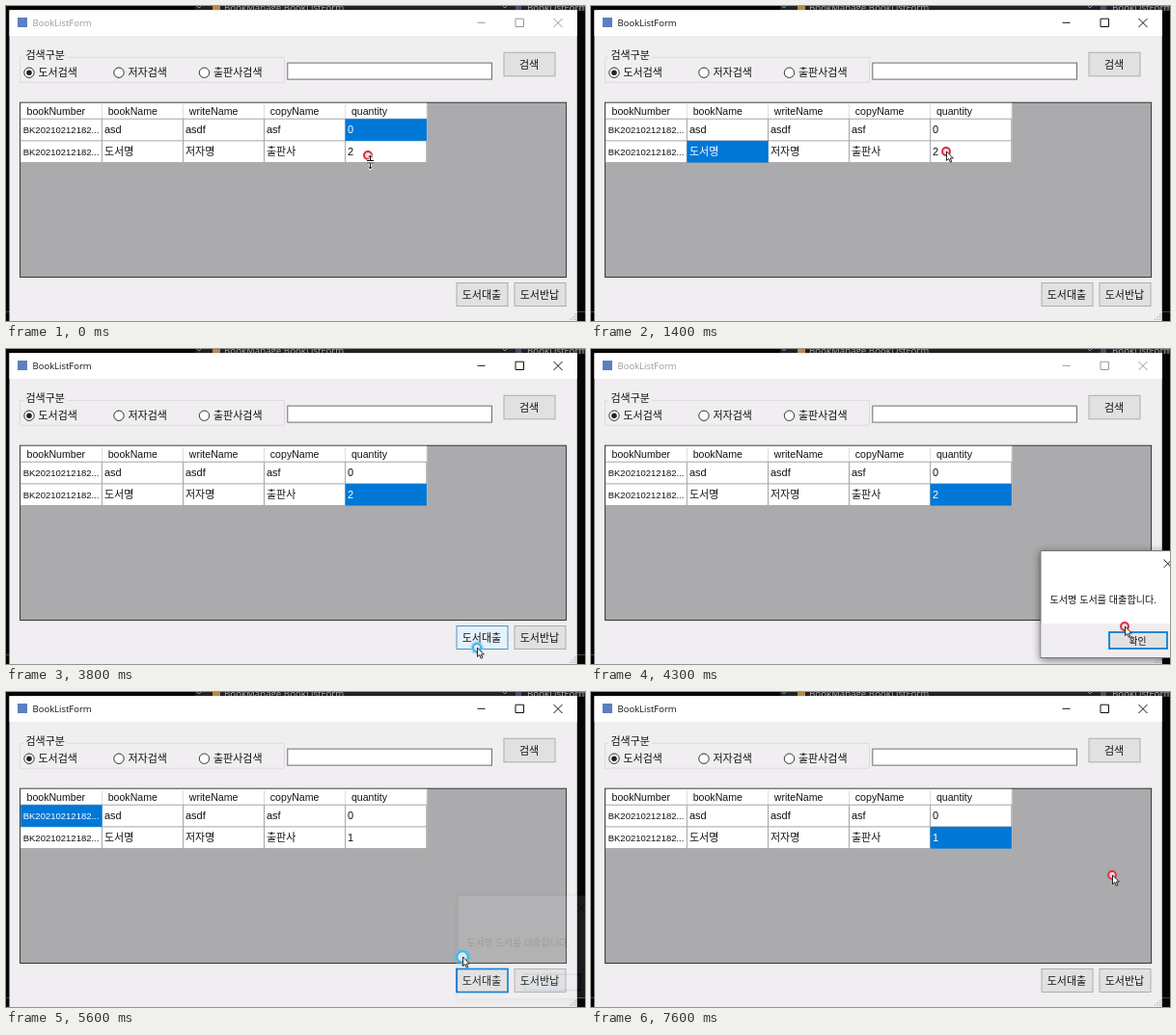
These frames come from a looping animation (600x327 px, 8 s). An HTML page:

```html
<!DOCTYPE html>
<html lang="ko">
<head>
<meta charset="utf-8">
<title>BookListForm</title>
<style>
html, body { margin: 0; width: 100%; height: 100%; overflow: hidden; background: #050505; }
svg { display: block; width: 100vw; height: 100vh; }
text { font-family: "Liberation Sans", "Noto Sans CJK KR", "Noto Sans CJK", sans-serif; font-size: 11px; fill: #111; white-space: pre; }
.ui { font-family: "Open Sans", "Noto Sans", sans-serif; }
.mid { text-anchor: middle; }
.tab { fill: #b0b0b0; }
#dialog { filter: drop-shadow(0 2px 4px rgba(0, 0, 0, .5)); }
</style>
</head>
<body>
<svg id="stage" viewBox="0 0 600 327"></svg>
<script>
const NS = 'http://www.w3.org/2000/svg';
const stage = document.getElementById('stage');
const BLUE = '#0078d7';
const LOOP = 8000, STEP = 100;

function add(parent, tag, attrs, content) {
  const el = document.createElementNS(NS, tag);
  set(el, attrs || {});
  if (content !== undefined) el.textContent = content;
  parent.appendChild(el);
  return el;
}
function set(el, attrs) {
  for (const key in attrs) el.setAttribute(key, attrs[key]);
}
function box(parent, x, y, width, height, fill, stroke) {
  return add(parent, 'rect', { x, y, width, height, fill, stroke: stroke || 'none' });
}
function path(parent, d, stroke, width = 1) {
  return add(parent, 'path', { d, stroke, fill: 'none', 'stroke-width': width });
}
function label(parent, x, y, str, size = 11, cls = '') {
  return add(parent, 'text', { x, y, class: cls, style: `font-size:${size}px` }, str);
}
function button(parent, x, y, w, h, str, size) {
  const face = box(parent, x, y, w, h, '#e1e1e1', '#adadad');
  label(parent, x + w / 2 - .5, y + h / 2 + 4, str, size, 'mid');
  return face;
}
function paintButton(face, hover, focus) {
  set(face, {
    fill: hover ? '#e5f1fb' : '#e1e1e1',
    stroke: focus ? BLUE : hover ? '#4f93c9' : '#adadad',
    'stroke-width': focus ? 1.7 : 1
  });
}

// Editor behind the window
box(stage, 0, 0, 600, 327, '#050505');
box(stage, 196, 0, 404, 5, '#222124');
path(stage, 'M0 317.500H600', '#444');
path(stage, 'M198 0l2 2 2-2M515 0l2 2 2-2', '#aaa', .8);
box(stage, 214, 0, 8, 4, '#b98a45');
box(stage, 528, 0, 6, 4, '#54486e');
label(stage, 226, 4.8, 'BookManage.BookListForm', 9.7, 'ui tab');
label(stage, 540, 4.8, 'BookListForm', 9.7, 'ui tab');

// Window frame
box(stage, 3.5, 4.3, 588.3, 323, '#f0eef0');
box(stage, 3.5, 4.3, 588.3, 26.7, '#fff');
box(stage, 12, 12, 10, 10, '#5b7fc0');
const title = label(stage, 27.5, 20.7, 'BookListForm', 9.5, 'ui');
const controls = path(stage, 'M488.500 17.300h8M528 13.200h8.500v8.300h-8.500zM567.500 13l9 9m0-9l-9 9', '#111');
for (let i = 0; i < 3; i++) {
  for (let j = 0; j <= i; j++) box(stage, 589 - 2.5 * j, 319.5 + 2.5 * i, 1.3, 1.3, '#b5b3b5');
}

// Search group
path(stage, 'M18 53.300H14.500V79.200H288.500V53.300H63', '#dddbdd');
label(stage, 20.5, 54.8, '검색구분', 11);
[[24, '도서검색'], [117, '저자검색'], [205.500, '출판사검색']].forEach(([x, str], i) => {
  add(stage, 'circle', { cx: x, cy: 69.2, r: 5.2, fill: '#fff', stroke: '#333' });
  if (!i) add(stage, 'circle', { cx: x, cy: 69.2, r: 2.8, fill: '#222' });
  label(stage, x + 9.500, 73, str);
});
box(stage, 291.8, 59.1, 211.7, 17, '#fff', '#6e6e6e');
button(stage, 516, 48.3, 53, 24.5, '검색');

// Data grid
box(stage, 14.6, 100.2, 566, 181.3, '#abaaac', '#333');
box(stage, 15.2, 100.8, 421, 62.2, '#fff');
const edges = [15.2, 99.4, 183.5, 267.5, 351.6, 435.8];
const heads = ['bookNumber', 'bookName', 'writeName', 'copyName', 'quantity'];
const rows = [
  ['BK20210212182...', 'asd', 'asdf', 'asf', '0'],
  ['BK20210212182...', '도서명', '저자명', '출판사', '2']
];
const TOP = 117.2, ROW = 22.7;
path(stage, edges.slice(1).map(x => `M${x} 102V117`).join(''), '#dedede');
path(stage, [0, 1, 2].map(r => `M15.200 ${TOP + ROW * r}H436`).join('') +
  edges.slice(1).map(x => `M${x} ${TOP}v${2 * ROW}`).join(''), '#a6a4a6');
heads.forEach((str, c) => label(stage, edges[c] + 6.3, 112.5, str, 10.6));
const cells = rows.map((row, r) => row.map((str, c) => ({
  back: box(stage, edges[c], TOP + ROW * r, 84.3, ROW, 'none'),
  text: label(stage, edges[c] + 2.5, 132.2 + ROW * r, str, c ? 11 : 9.5)
})));

const lend = button(stage, 467, 287.5, 53, 24, '도서대출');
button(stage, 527, 287.5, 53, 24, '도서반납');

// Message box
const dialog = add(stage, 'g', { id: 'dialog' });
box(dialog, 466, 209.5, 142, 111, '#fff', '#77757a');
box(dialog, 466.5, 285, 141, 35, '#f0eef0');
label(dialog, 475.5, 263.5, '도서명 도서를 대출합니다.', 10.1);
path(dialog, 'M593.500 218.500l8.500 8.500m0-8.500l-8.500 8.500', '#222');
const ok = button(dialog, 537, 294, 60, 17, '확인', 9.8);

// Pointer
const pointer = add(stage, 'g');
const ring = add(pointer, 'g');
add(ring, 'circle', { r: 5.2, fill: '#f6a8ae', opacity: .55 });
add(ring, 'circle', { r: 3.9, fill: '#fbd9dc', stroke: '#dc2f40', 'stroke-width': 2 });
const burst = add(pointer, 'g');
const glow = add(burst, 'circle', { fill: '#e6f6fd', opacity: .8 });
const rays = add(burst, 'circle', { fill: 'none', stroke: '#62c0ea', 'stroke-width': 3, opacity: .6 });
const core = add(burst, 'circle', { fill: 'none', stroke: '#45b4e8', 'stroke-width': 2.2 });
const arrow = add(pointer, 'path', {
  d: 'M.5 0V9.500L2.700 7.500 4.300 11.200 5.800 10.500 4.300 7H7.300Z',
  fill: '#fff', stroke: '#111', 'stroke-width': .9
});
const sizer = add(pointer, 'g');
for (const [stroke, width] of [['#fff', 2.4], ['#111', 1]]) {
  path(sizer, 'M2.500 0V5M.500 2.200L2.500 0 4.500 2.200M-1 5.500H6M-1 8H6M2.500 8.500V14M.500 11.800L2.500 14 4.500 11.800', stroke, width);
}

// time, x, y
const route = [
  [0, 375, 155], [200, 372, 153], [600, 150, 151], [800, 150, 151], [1400, 368, 151],
  [2100, 374, 152], [2700, 371.5, 150.5], [2900, 374, 153], [3500, 488, 310], [3800, 488, 310],
  [4300, 553, 288], [4800, 567, 301], [5400, 567, 301], [5600, 473, 275],
  [6200, 460, 262], [6900, 386, 151], [7100, 386, 151], [7600, 540, 190], [8000, 540, 190]
];
const clicks = [600, 2500, 3700, 5400, 7000];
// time, row, column
const picks = [[0, 0, 4], [700, 1, 1], [2800, 1, 4], [5500, 0, 0], [7100, 1, 4]];

const clamp = v => Math.max(0, Math.min(1, v));
const within = (t, from, to) => t >= from && t < to;

function place(t) {
  const i = Math.max(1, route.findIndex(p => p[0] > t));
  const [t0, x0, y0] = route[i - 1], [t1, x1, y1] = route[i];
  const p = clamp((t - t0) / (t1 - t0));
  const e = p * p * (3 - 2 * p);
  return [x0 + (x1 - x0) * e, y0 + (y1 - y0) * e];
}

function draw(t) {
  const [x, y] = place(t);
  const active = within(t, 300, 4000) || t >= 5500;
  title.style.fill = active ? '#111' : '#999';
  set(controls, { stroke: active ? '#111' : '#999' });

  const [, row, col] = picks.filter(p => p[0] <= t).pop();
  cells.forEach((line, r) => line.forEach((cell, c) => {
    const on = r === row && c === col;
    set(cell.back, { fill: on ? BLUE : 'none' });
    cell.text.style.fill = on ? '#fff' : '#111';
  }));
  cells[1][4].text.textContent = t < 5500 ? '2' : '1';

  const over = x > 467 && x < 520 && y > 287 && y < 312;
  paintButton(lend, over, within(t, 3900, 7200));

  const shown = t < 5000 ? clamp((t - 3900) / 200) : clamp(1 - (t - 5400) / 220);
  const scale = 1 - .036 * (1 - shown);
  set(dialog, {
    opacity: shown,
    display: shown ? 'inline' : 'none',
    transform: `translate(537 265) scale(${scale}) translate(-537 -265)`
  });
  paintButton(ok, t >= 4700, true);

  set(pointer, { transform: `translate(${x} ${y})` });
  const click = clicks.find(c => within(t, c, c + 300));
  const pressed = click !== undefined;
  set(ring, { display: pressed ? 'none' : 'inline' });
  set(burst, { display: pressed ? 'inline' : 'none' });
  if (pressed) {
    const r = 2.2 + 5.5 * (t - click) / 300;
    const dash = Math.PI * (r + 1.5) / 12;
    set(glow, { r: r + 1 });
    set(core, { r });
    set(rays, { r: r + 1.5, 'stroke-dasharray': `${dash * 1.3} ${dash * .7}` });
  }
  set(arrow, { display: t < 200 ? 'none' : 'inline' });
  set(sizer, { display: t < 200 ? 'inline' : 'none' });
}

const start = performance.now();
function tick() {
  const t = (performance.now() - start) % LOOP;
  draw(Math.floor(t / STEP) * STEP);
  requestAnimationFrame(tick);
}
draw(0);
requestAnimationFrame(tick);
</script>
</body>
</html>
```
